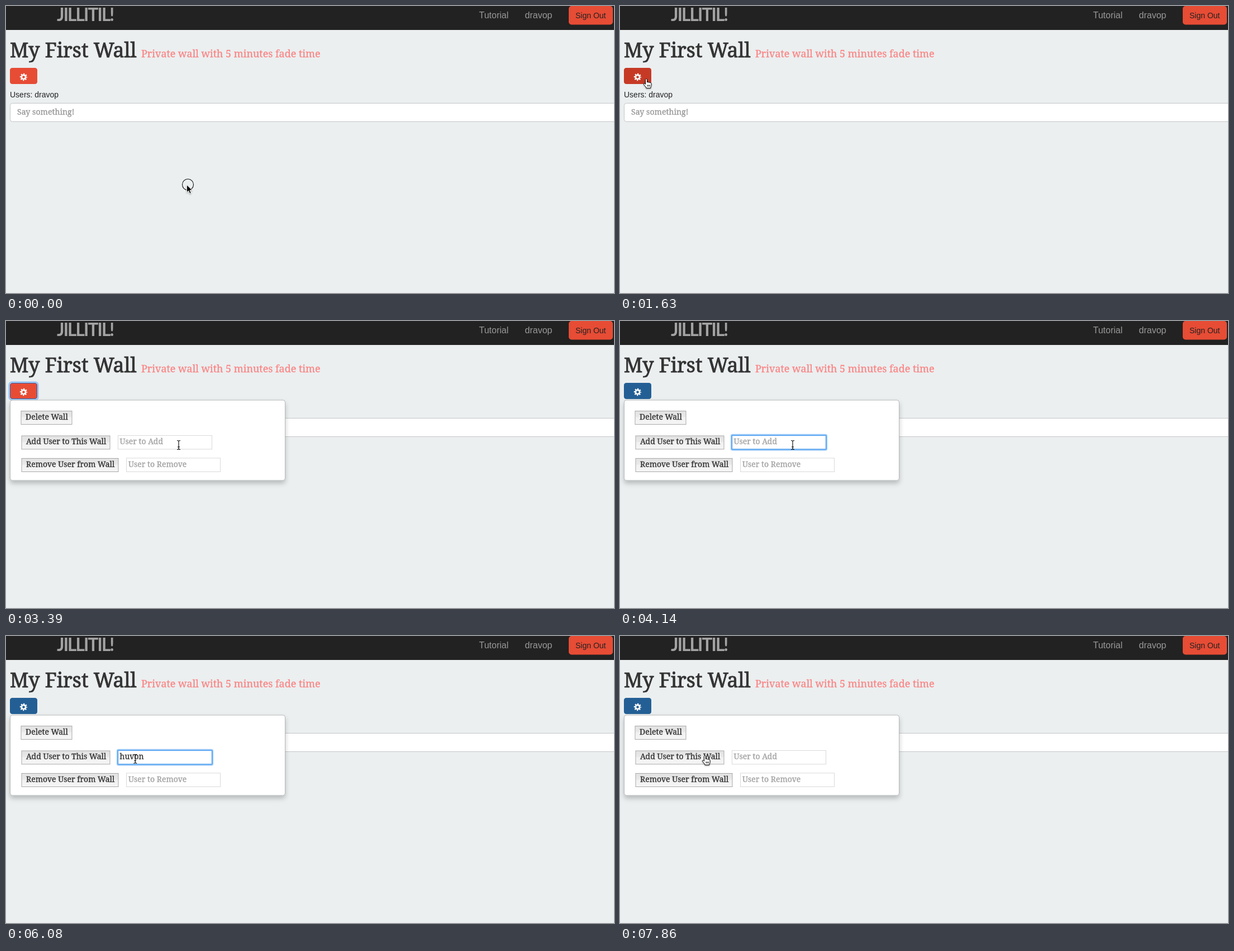
These frames come from a looping animation (1088x515 px, 8000 ms). An HTML page:

```html
<!DOCTYPE html>
<html lang="en">
<head>
<meta charset="utf-8">
<title>Wall settings</title>
<style>
  html, body { margin: 0; width: 100%; height: 100%; overflow: hidden; background: #ebeff0; }
  svg { display: block; width: 100%; height: 100%; }
  text { white-space: pre; }
  .sans { font-family: "Liberation Sans", Arial, sans-serif; font-size: 14px; fill: #222; }
  .nav { font-size: 16px; fill: #999; }
  .slab { font-family: "Noto Serif", serif; font-size: 14px; color: #333;
          fill: currentColor; stroke: currentColor; stroke-width: .35px; }
  .title { font-size: 35.6px; stroke-width: .9px; }
  .subtitle { font-size: 17.95px; color: #fb8585; }
  .hint { color: #a2a2a2; }
  .logo { font: 700 31.5px Lato, sans-serif; letter-spacing: -1.9px; fill: #a3a3a3; }
  .field { fill: #fff; stroke: #d9d9d9; }
  .button { fill: url(#face); stroke: #a9a9a9; }
  .button.down { fill: url(#pressed); }
</style>
</head>
<body>
<svg viewBox="0 0 1088 515">
  <defs>
    <linearGradient id="face" x2="0" y2="1">
      <stop offset="0" stop-color="#e2e2e2"/><stop offset=".45" stop-color="#e9e9e9"/>
      <stop offset=".5" stop-color="#f1f1f1"/><stop offset="1" stop-color="#f5f5f5"/>
    </linearGradient>
    <linearGradient id="pressed" x2="0" y2="1">
      <stop offset="0" stop-color="#c4c4c4"/><stop offset="1" stop-color="#dcdcdc"/>
    </linearGradient>
    <filter id="drop" x="-10%" y="-10%" width="120%" height="130%">
      <feDropShadow dx="0" dy="5" stdDeviation="4.5" flood-opacity=".22"/>
    </filter>
    <filter id="soft" x="-50%" y="-50%" width="200%" height="200%">
      <feDropShadow dx="0" dy="1.5" stdDeviation="1" flood-opacity=".35"/>
    </filter>
  </defs>

  <rect width="1088" height="515" fill="#ebeff0"/>
  <rect width="1088" height="43" fill="#222"/>
  <text class="logo" x="91" y="27">JILLITIL!</text>
  <text class="sans nav" x="846.5" y="22">Tutorial</text>
  <text class="sans nav" x="928.5" y="22">dravop</text>
  <rect x="1007" width="79" height="33.5" rx="5" fill="#e74c35"/>
  <text class="sans" x="1019" y="22">Sign Out</text>

  <text class="slab title" x="7" y="92">My First Wall</text>
  <text class="slab subtitle" x="242" y="92">Private wall with 5 minutes fade time</text>
  <text class="sans" x="7" y="164">Users: dravop</text>
  <rect class="field" x="7.5" y="174.5" width="1100" height="33" rx="4" style="stroke:#c2c6c7"/>
  <text class="slab hint" x="20" y="195" style="color:#999;font-size:14.15px">Say something!</text>

  <rect id="gearRing" x="5.5" y="109.5" width="52" height="32" rx="5" fill="none" stroke="#8fc0f5" stroke-width="2"/>
  <rect id="gear" x="7.5" y="111.5" width="48" height="28" rx="3.5"/>
  <g fill="none" stroke="#fff">
    <circle cx="31.5" cy="127.5" r="3.6" stroke-width="2.6"/>
    <circle cx="31.5" cy="127.5" r="5.6" stroke-width="2.2" stroke-dasharray="2.2 2.2" stroke-dashoffset="1.1"/>
  </g>

  <g id="panel">
    <rect x="7.5" y="142" width="492" height="144" rx="4" fill="#fff" stroke="#b5b8b9" filter="url(#drop)"/>
    <rect class="button" x="27" y="161.5" width="91" height="24"/>
    <text class="slab" x="35" y="177">Delete Wall</text>
    <rect class="button" id="add" x="28" y="206" width="158" height="24"/>
    <text class="slab" x="36" y="221">Add User to This Wall</text>
    <rect class="button" x="28" y="246.5" width="173" height="24"/>
    <text class="slab" x="36" y="262">Remove User from Wall</text>
    <rect class="field" x="200.5" y="205.5" width="168" height="24.5"/>
    <g id="fieldRing" fill="none" stroke="#5ea9f3">
      <rect x="199.5" y="204.5" width="170" height="26.5" rx="2" stroke-width="4" opacity=".4"/>
      <rect x="200" y="205" width="169" height="25.5" rx="1" stroke-width="2"/>
    </g>
    <text class="slab" id="entry" x="203.5" y="221"></text>
    <rect id="caret" y="209" width="1" height="16" fill="#111"/>
    <rect class="field" x="215.5" y="246" width="168" height="24.5"/>
    <text class="slab hint" x="219" y="262">User to Remove</text>
  </g>

  <circle id="ripple" r="10" fill="none" stroke="#111" stroke-width="1.1"/>
  <g id="cursor">
    <path id="arrow" filter="url(#soft)" d="M0 0V13.5L3.2 10.6 5.4 15.6 7.8 14.5 5.6 9.7H9.8Z" fill="#000" stroke="#fff" stroke-width=".9"/>
    <path id="hand" filter="url(#soft)" d="M-3 9.5V1.2C-3-.8 0-.8 0 1.2V6C.5 5 2.6 5 2.8 6.4 3.5 5.5 5.2 5.8 5.4 7 6.2 6.4 7.6 6.8 7.6 8.2V11.5
      C7.6 13 6.3 13.8 6.3 16.3H-1.5C-1.5 14.5-4 12.5-6 9.8-6.8 8-4.8 7-3 9.5ZM.6 10.5V13.5M2.7 10.5V13.5M4.8 10.5V13.5"
      fill="#fff" stroke="#000" stroke-linejoin="round"/>
    <path id="beam" d="M-3-8C-1-8 0-7.5 0-6.5 0-7.5 1-8 3-8M-3 8C-1 8 0 7.5 0 6.5 0 7.5 1 8 3 8M0-6.5V6.5M-2 3.5H2" fill="none" stroke="#000" stroke-width="1.1"/>
  </g>
</svg>

<script>
const LOOP = 8000;
const NAME = "huvon";
const KEYS = [4430, 4730, 4880, 5030, 5330];
// [first step, last step, steps, from, to]
const MOVES = [
  [600, 1630, 8, [323.5, 321], [48.5, 131]],
  [2365, 3390, 8, [48.5, 131], [309, 222.5]],
  [5780, 6520, 6, [309, 222.5], [153.5, 218]],
  [7860, 7860, 1, [153.5, 218], [153.5, 215]]
];
// [on, off, x, y]
const CLICKS = [
  [0, 150, 325.5, 320.5],
  [2070, 2220, 49, 129],
  [3540, 3690, 309, 222.5],
  [6810, 7260, 153.5, 217.5]
];

const el = id => document.getElementById(id);
const show = (id, on) => { el(id).style.display = on ? "" : "none"; };
const within = (t, a, b) => t >= a && t < b;
const smooth = k => k * k * (3 - 2 * k);
const inBox = ([x, y], l, t, r, b) => x >= l && x <= r && y >= t && y <= b;

function pointer(t) {
  let pos = MOVES[0][3];
  for (const [start, end, steps, from, to] of MOVES) {
    if (t < start) break;
    const gap = (end - start) / (steps - 1) || 1;
    const step = Math.min(steps, Math.floor((t - start) / gap + 0.03) + 1);
    const k = smooth(step / steps);
    pos = from.map((v, i) => v + (to[i] - v) * k);
  }
  return pos;
}

function draw(t) {
  const pos = pointer(t);
  const open = t >= 2070;
  const focused = within(t, 3540, 6810);
  const onGear = inBox(pos, 7, 111, 56, 140);
  const onAdd = open && inBox(pos, 28, 206, 186, 230);
  const onField = open && inBox(pos, 200, 205, 369, 230);

  const shape = onGear || onAdd ? "hand" : onField ? "beam" : "arrow";
  for (const id of ["arrow", "hand", "beam"]) show(id, id === shape);
  el("cursor").setAttribute("transform", `translate(${pos})`);

  const click = CLICKS.find(([on, off]) => within(t, on, off));
  show("ripple", click);
  if (click) el("ripple").setAttribute("transform", `translate(${click[2]} ${click[3]})`);

  const gearFocus = within(t, 2070, 3540);
  const fill = t >= 3540 ? "#235f95" : onGear && !open ? "#c63a25" : "#e74c35";
  el("gear").setAttribute("fill", fill);
  el("gear").setAttribute("stroke", gearFocus ? "#2b5fae" : fill);
  show("gearRing", gearFocus);
  show("panel", open);
  show("fieldRing", focused);
  el("add").classList.toggle("down", within(t, 6810, 7260));

  const typed = t < 7260 ? KEYS.filter(k => k <= t).length : 0;
  const entry = el("entry");
  entry.textContent = typed ? NAME.slice(0, typed) : "User to Add";
  entry.classList.toggle("hint", !typed);

  const lastKey = typed ? KEYS[typed - 1] : 3540;
  const blink = t - lastKey < 600 || t >= 6520;
  show("caret", focused && blink);
  if (open) el("caret").setAttribute("x", typed ? Math.round(203.5 + entry.getComputedTextLength()) : 203);
}

const begin = performance.now();
function tick() {
  draw((performance.now() - begin) % LOOP);
  requestAnimationFrame(tick);
}
tick();
</script>
</body>
</html>
```
